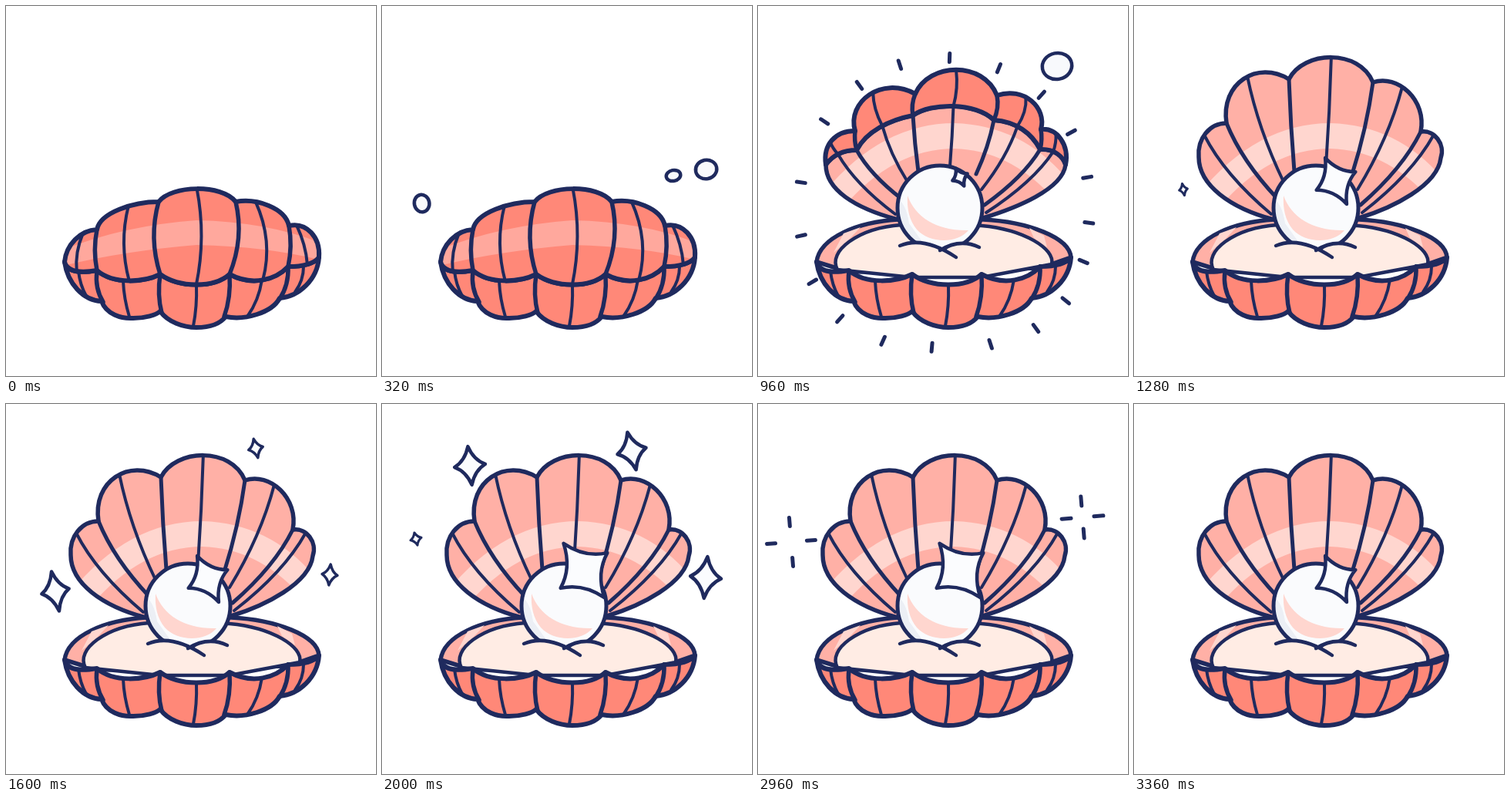
These frames come from a looping animation (480 px wide and 480 px high, 3440 ms). An HTML page with a canvas:

```html
<!DOCTYPE html>
<html lang="en">
<head>
<meta charset="utf-8">
<title>Clam and pearl</title>
<style>
html, body { margin: 0; width: 100%; height: 100%; overflow: hidden; background: #fff; }
canvas { display: block; width: 100%; height: 100%; }
</style>
</head>
<body>
<canvas id="stage" width="480" height="480"></canvas>
<script>
const ctx = document.getElementById('stage').getContext('2d');
const NAVY = '#1f2a5e', CORAL = '#ff8878', PINK = '#ffb0a6', PALE = '#ffd6cf', CREAM = '#ffece4';
const LOOP = 3440, STEP = 80, HINGE = 277;

// Each edge is a chain of five cubic lobes: closed, ajar, open.
const OUTER = [
  [76,332, 78,310, 96,291, 118,290, 122,268, 165,254, 198,254, 215,232, 280,231, 298,254,
   325,249, 362,262, 367,285, 390,280, 408,300, 406,326],
  [88,206, 84,180, 100,162, 126,162, 115,125, 160,90, 204,114, 222,73, 292,71, 310,116,
   345,104, 375,132, 367,160, 388,158, 404,180, 399,206],
  [84,196, 82,172, 98,152, 120,152, 112,100, 160,70, 201,95, 220,58, 292,55, 310,99,
   342,88, 380,122, 372,163, 390,160, 404,180, 398,197]
];
const RIM = [
  [76,332, 80,347, 100,346, 118,343, 140,362, 180,358, 200,348, 225,366, 270,366, 290,348,
   320,364, 350,355, 366,338, 385,338, 400,334, 406,326],
  [88,206, 98,192, 112,187, 128,187, 140,163, 170,148, 201,142, 225,125, 282,125, 306,148,
   335,150, 355,165, 366,186, 385,185, 396,196, 399,206],
  OUTER[2]
];
const CLOSED_MIDS = [.7, .62, .5, .3, .15], OPEN_MIDS = [.45, .55, .5, .4, .35];
const BULGE = [-.13, -.1, -.13, -.15, .1, .16, .18, .1, .1];
const ROOTS = [[178,270], [186,250], [194,228], [208,215], [249,208], [283,218], [290,238], [294,258], [296,268]];
const RAYS = [88, 68, 48, 29, 10, -8, -23, -39, -54, -72, -95, -114, -132, -149, -167, 172, 146, 126, 108];

// x, y, half width, half height, tilt, birth step, burst step
const SPARKLES = [
  [64, 243, 18, 26, -11, 16, 21],
  [324, 61, 19, 25, -13, 19, 27],
  [420, 225, 20, 27, 5, 19, 27],
  [114, 80, 20, 25, -6, 21, 31],
  [44, 180, 24, 28, -14, 25, 36],
  [422, 148, 22, 25, -2, 27, 37]
];

const clamp = (v, a = 0, b = 1) => Math.min(b, Math.max(a, v));
const mix = (a, b, t) => a + (b - a) * t;
const pose = (keys, s) => {
  const i = s > 1 ? 1 : 0;
  return keys[i].map((v, k) => mix(v, keys[i + 1][k], s - i));
};
const curve = p => {
  let d = `M${p[0]} ${p[1]}`;
  for (let i = 2; i < p.length; i += 6) d += `C${p.slice(i, i + 6)}`;
  return d;
};
const reversed = p => p.map((_, i) => p[p.length - 2 - i + 2 * (i % 2)]);
const onLobe = (p, lobe, t) => [0, 1].map(k => {
  const [a, b, c, d] = [0, 2, 4, 6].map(o => p[lobe * 6 + o + k]), u = 1 - t;
  return a * u * u * u + 3 * b * u * u * t + 3 * c * u * t * t + d * t * t * t;
});
// Rib ends alternate: lobe middle, joint, lobe middle...
const ribEnds = (p, mids) => BULGE.map((_, i) =>
  i % 2 ? onLobe(p, (i - 1) / 2, 1) : onLobe(p, i / 2, mids[i / 2]));

function draw(d, fill, width) {
  const path = new Path2D(d);
  if (fill) { ctx.fillStyle = fill; ctx.fill(path); }
  if (width) { ctx.strokeStyle = NAVY; ctx.lineWidth = width; ctx.stroke(path); }
}
function clipped(d, paint) {
  ctx.save();
  ctx.clip(new Path2D(d));
  paint();
  ctx.restore();
}
function tick(x, y, angle, r, len) {
  const c = Math.cos(angle), s = Math.sin(angle), a = r - len / 2, b = r + len / 2;
  draw(`M${x + c * a} ${y + s * a}L${x + c * b} ${y + s * b}`, null, 5);
}
function star(x, y, w, h, tilt, width) {
  ctx.save();
  ctx.translate(x, y);
  ctx.rotate(tilt * Math.PI / 180);
  const a = w * .28, b = h * .28;
  draw(`M0 ${-h}Q${a} ${-b} ${w} 0Q${a} ${b} 0 ${h}Q${-a} ${b} ${-w} 0Q${-a} ${-b} 0 ${-h}Z`, '#fbfcfe', width);
  ctx.restore();
}

function lidInside(rim) {
  const [x0, y0] = rim, [x1, y1] = rim.slice(-2);
  const d = curve(rim) +
    `C${x1 - 4} ${mix(y1, HINGE, .45)} 335 262 292 275L181 ${HINGE}C125 262 ${x0} ${mix(y0, HINGE, .45)} ${x0} ${y0}Z`;
  draw(d, PINK);
  clipped(d, () => draw('M70 262Q150 152 255 152Q350 155 410 236L380 246Q325 187 255 185Q175 185 110 262Z', PALE));
  ribEnds(rim, OPEN_MIDS).forEach(([x, y], i) => {
    const [bx, by] = ROOTS[i];
    draw(`M${x} ${y}Q${mix(bx, x, .7)} ${(y + by) / 2} ${bx} ${by}`, null, i % 2 ? 5 : 4);
  });
  draw(d, null, 5.5);
}

function lidOutside(outer, rim, s) {
  const d = curve(outer) + curve(reversed(rim)).replace('M', 'L') + 'Z';
  draw(d, CORAL);
  const shine = clamp(1 - s);
  if (shine) clipped(d, () => {
    ctx.globalAlpha = shine;
    ctx.translate(0, -150 * s);
    draw('M70 318Q150 285 247 278Q340 280 410 308V330Q340 312 247 310Q150 318 70 338Z', '#ffa89d');
  });
  const mids = CLOSED_MIDS.map((m, i) => mix(m, OPEN_MIDS[i], clamp(s)));
  const feet = ribEnds(rim, mids.map((m, i) => mix(.5, OPEN_MIDS[i], clamp(s))));
  ribEnds(outer, mids).forEach(([x, y], i) => {
    const [fx, fy] = feet[i];
    draw(`M${x} ${y}Q${(x + fx) / 2 + BULGE[i] * (fy - y)} ${(y + fy) / 2} ${fx} ${fy}`, null, i % 2 ? 5.5 : 4);
  });
  draw(d, null, 6);
}

function bowlInside() {
  draw('M76 332C80 300 130 280 182 277L292 277C350 280 404 300 406 326L366 340L118 345Z', PINK, 5.5);
  draw('M111 295L133 287L117 304L98 320ZM352 288L371 298L375 313L358 301Z', PALE);
  draw('M103 342C90 318 130 288 186 284L290 285C345 290 386 315 381 335L290 352L200 352Z', CREAM, 4.5);
}

function bowlFront() {
  const bottom = 'C404 355 380 377 355 379C345 398 310 408 285 403C278 412 265 417 247 417' +
    'C230 417 210 410 200 396C195 401 180 405 165 405C150 406 130 400 124 383C100 382 80 360 76 332Z';
  const d = curve(RIM[0]) + bottom;
  draw(d, CORAL);
  draw('M94 344Q96 362 104 376M152 357Q153 380 160 403M247 362Q248 390 243 415M332 355Q328 382 313 403M386 338Q386 356 375 371', null, 4);
  draw('M118 344Q115 366 126 384M200 348Q196 375 202 398M290 348Q292 378 283 403M366 338Q367 362 355 380', null, 5.5);
  draw(d, null, 6);
}

function pearl() {
  const d = 'M181 262a55 55 0 1 1 110 0a55 55 0 1 1 -110 0Z';
  draw(d, '#fafbfd');
  clipped(d, () => {
    draw('M180 250Q192 255 196 282L222 318H180Z', '#eceff5');
    draw('M194 246C204 274 232 292 273 291C258 309 222 308 206 290C196 278 193 262 194 246Z', PALE);
  });
  draw(d, null, 5);
  draw('M184 311Q214 298 242 318Q262 301 287 313L300 345H160Z', CREAM);
  draw('M184 311Q215 298 257 326M236 317Q262 301 287 313', null, 4.5);
}

function pearlGlint(n) {
  if (n < 11) return;
  const grow = clamp(mix(.38, 1, (n - 12) / 3), .25);
  const pulse = Math.max(...[25, 37].map(c => clamp(1.15 - Math.abs(n - c) / 4)));
  star(262, mix(mix(219, 227, grow), 216, pulse), mix(28, 38, pulse) * grow, mix(33, 44, pulse) * grow,
    mix(-25, -37, pulse), 4.5);
}

function sparkle([x, y, w, h, tilt, birth, burst], n) {
  if (n < birth || n > burst + 2) return;
  if (n < burst) {
    const s = Math.min(1, .3 + .2 * (n - birth));
    star(x, y - 7 * (1 - s), w * s, h * s, tilt, 2.5 + 2 * s);
  } else {
    const k = n - burst;
    for (let i = 0; i < 4; i++) tick(x - 1, y - 1, i * Math.PI / 2 - .08, 21 + 5 * k, [12, 11, 5][k]);
  }
}

function bubble(x, y, r, wobble) {
  ctx.beginPath();
  ctx.ellipse(x, y, r - wobble, r + wobble, -.2, 0, 7);
  ctx.fillStyle = '#f8f9fc';
  ctx.fill();
  ctx.strokeStyle = NAVY;
  ctx.lineWidth = 4.5;
  ctx.stroke();
}
function pop(x, y, k) {
  for (let i = 0; i < 7; i++) tick(x, y, -1.95 + i * Math.PI * 2 / 7, 18 + 4 * k, 7 - 2 * k);
}
function bubbles(n) {
  const size = b => clamp((n - b + 1) / 4);
  if (n >= 2 && n < 10) bubble(53 + 4 * Math.sin((n - 8) * .7), 188 - 17 * (n - 8), 14 * size(2), Math.sin(n - 8));
  else if (n >= 10 && n < 12) pop(54, 150, n - 10);

  if (n >= 2 && n < 13) bubble(383 + 1.25 * (n - 8), 149 - 17.75 * (n - 8), (14.5 + (n - 8) * .9) * size(2), 1.6 * Math.cos((n - 8) * .6));
  else if (n >= 13 && n < 15) pop(389, 64, n - 13);

  if (n >= 1 && n < 7) bubble(421 + 3 * Math.sin(n - 7), 158 - 18 * (n - 7), 13 * size(1), Math.sin(n));
  else if (n >= 7 && n < 10) pop(421, 158, n - 7);
}

function rays(n) {
  const k = n - 11;
  if (k < 0 || k > 4) return;
  for (const deg of RAYS) {
    const a = -deg * Math.PI / 180;
    const extra = deg < 0 ? 15 * Math.sin(2 * a) ** 2 : 0;
    tick(242, 255, a, [172, 188, 200, 207, 212][k] + extra, [14, 11, 9, 6, 3][k]);
  }
}

function openness(n) {
  if (n < 8) return 0;
  return [-.02, -.03, .35, .75, 1, 1.7][n - 8] ?? 2;
}

function frame(now) {
  const n = Math.floor(now % LOOP / STEP), s = openness(n);
  const outer = pose(OUTER, s), rim = pose(RIM, s);
  ctx.fillStyle = '#fff';
  ctx.fillRect(0, 0, 480, 480);
  ctx.lineCap = ctx.lineJoin = 'round';
  rays(n);
  if (s > 0) {
    lidInside(rim);
    bowlInside();
    pearl();
    pearlGlint(n);
  }
  bowlFront();
  if (s < 2) lidOutside(outer, rim, s);
  bubbles(n);
  SPARKLES.forEach(p => sparkle(p, n));
}

const start = performance.now();
(function loop() {
  frame(performance.now() - start);
  requestAnimationFrame(loop);
})();
</script>
</body>
</html>
```
